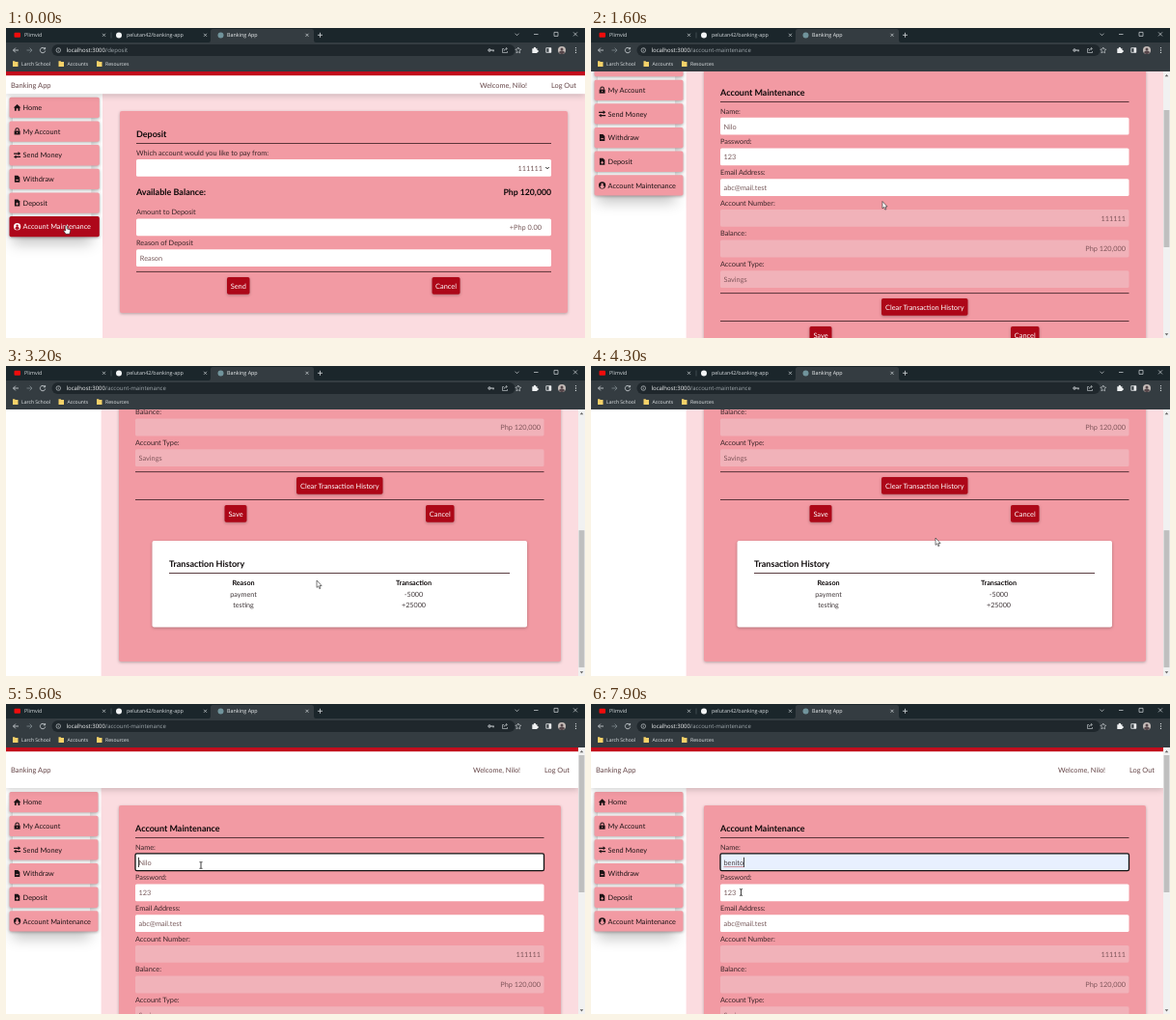
Animation, 600 px wide and 321 px high, one loop 8000 ms. Source, as an HTML page:

```html
<!DOCTYPE html>
<html lang="en">
<head>
<meta charset="utf-8">
<title>Banking App</title>
<style>
  html, body { margin: 0; width: 100%; height: 100%; overflow: hidden; }
  svg { display: block; width: 600px; height: 321px; }
  text { font-family: Lato, "Open Sans", sans-serif; text-rendering: geometricPrecision; white-space: pre; }
  .ui text { font-family: "Open Sans", "Noto Sans", sans-serif; }
  .bold { font-weight: 700; }
  .card { filter: drop-shadow(0 1px 1.5px rgba(0, 0, 0, .28)); }
  .head { filter: drop-shadow(0 2px 3px rgba(0, 0, 0, .18)); }
  .list { filter: drop-shadow(0 9px 7px rgba(0, 0, 0, .22)); }
  .item rect { fill: #f29aa3; filter: drop-shadow(0 1px 1.5px rgba(0, 0, 0, .3)); }
  .item { fill: #1c1315; color: #f29aa3; }
  .item.hot { fill: #fff; color: #ae071a; }
  .item.hot rect { fill: #ae071a; }
</style>
</head>
<body>
<svg id="stage" viewBox="0 0 600 321"></svg>
<script>
const PINK = '#fbdce0', ROSE = '#f29aa3', RED = '#ad0718', INK = '#3a2528', SOFT = '#77595a', BLACK = '#0d0809';
const BASE = 7.35, LOOP = 8000, PITCH = 24.65;

const rect = (x, y, w, h, fill, more = '') =>
  `<rect x="${x}" y="${y}" width="${w}" height="${h}" fill="${fill}" ${more}/>`;
// y is the optical middle of the line
const text = (s, x, y, fill = INK, size = BASE, more = '') =>
  `<text x="${x}" y="${y + size * .35}" font-size="${size}" fill="${fill}" ${more}>${s}</text>`;
const path = (d, more = '') => `<path d="${d}" ${more}/>`;
const line = (d, color, w = .8, more = '') => path(d, `fill="none" stroke="${color}" stroke-width="${w}" ${more}`);
const dot = (x, y, r, fill, more = '') => `<circle cx="${x}" cy="${y}" r="${r}" fill="${fill}" ${more}/>`;
const at = (x, y, body, more = '') => `<g transform="translate(${x} ${y})" ${more}>${body}</g>`;
const END = 'text-anchor="end"', MID = 'text-anchor="middle"', BOLD = 'class="bold"';

const rule = (x1, x2, y) => line(`M${x1} ${y}H${x2}`, '#4a2a2e', .9);
const title = (s, x, y) => text(s, x, y, BLACK, 9, BOLD);
const box = (x, y, w, fill = '#fff', more = '') => rect(x, y, w, 17.8, fill, 'rx="1.6" ' + more);
const button = (s, x, y, w) =>
  rect(x, y, w, 17.8, RED, 'rx="1.8" class="card"') + text(s, x + w / 2, y + 9.1, '#fff', 7.4, MID);

// Sidebar icons, each about 7 px around the origin
const file = 'M-2.7 -3.5H.7L2.7 -1.5V3.5H-2.7Z';
const icons = {
  'Home': path('M-3.8 .2L0 -3.4L3.8 .2H2.7V3.3H.9V.9H-.9V3.3H-2.7V.2Z'),
  'My Account': path('M-3 -.6H3V3.4H-3Z') + line('M-1.7 -.5V-1.6A1.7 1.7 0 0 1 1.7 -1.6V-.5', 'inherit', 1.1, 'style="stroke:#1c1315"') + dot(0, 1.3, .6, 'currentColor'),
  'Send Money': path('M-3.5 -2.2H1V-3.6L3.6 -1.6L1 .3V-1H-3.5ZM3.5 1.1H-1V-.2L-3.6 1.7L-1 3.6V2.3H3.5Z'),
  'Withdraw': path(file) + line('M-1.4 1.1H1.4', 'currentColor', .9),
  'Deposit': path(file) + line('M-1.4 1.1H1.4M0 -.3V2.5', 'currentColor', .9),
  'Account Maintenance': dot(0, 0, 3.6, 'inherit', 'style="fill:inherit"') + dot(0, -1, 1.2, 'currentColor') + path('M-2.2 2A2.2 2 0 0 1 2.2 2A3 3 0 0 1 -2.2 2Z', 'fill="currentColor"')
};

const sidebar = (top, w) =>
  rect(7, top + 4, w - 12, 139, '#fff', 'class="list"') +
  Object.keys(icons).map((name, i) => {
    const y = top + i * PITCH;
    return `<g class="item">${rect(3.5, y, w, 21.3, ROSE, 'rx="1.8"')}` +
      at(11.6, y + 10.6, icons[name]) + text(name, 17.6, y + 10.8, 'inherit', BASE, 'style="fill:inherit"') + '</g>';
  }).join('');

const header = (w, h, right) =>
  rect(0, 49, w, h, '#fff', 'class="head"') + rect(0, 45, w, 4.2, '#c20c1c') +
  text('Banking App', 5, 49.8 + h / 2, '#654547', 7.5) +
  text('Welcome, Nilo!', right, 49.8 + h / 2, '#654547') + text('Log Out', right + 74, 49.8 + h / 2, '#654547');

function depositPage() {
  return rect(0, 45, 600, 276, PINK) + rect(0, 45, 100, 276, '#fff') +
    sidebar(71.8, 93.3) + header(600, 19.2, 491) +
    rect(118, 86, 464, 209, ROSE, 'rx="2" class="card"') +
    title('Deposit', 135, 110) + rule(135, 565, 119.5) +
    text('Which account would you like to pay from:', 135, 129) + box(135, 136, 430) +
    text('111111', 556, 145, SOFT, BASE, END) + line('M559.3 144L561 145.8L562.7 144', '#222', 1) +
    text('Available Balance:', 135, 170.3, BLACK, 9, BOLD) +
    text('Php 120,000', 565, 170.3, BLACK, 8.7, 'class="bold" ' + END) +
    text('Amount to Deposit', 135, 190.7) + box(135, 197.4, 430) +
    text('+Php 0.00', 555, 206.5, SOFT, BASE, END) +
    text('Reason of Deposit', 135, 222.5) + box(135, 229.3, 430) + text('Reason', 138.8, 238.4, SOFT) +
    rule(135, 565, 252.4) + button('Send', 229, 258, 23.5) + button('Cancel', 441.5, 258, 29);
}

const fields = [
  ['Name:', ''], ['Password:', '123'], ['Email Address:', 'abc@mail.test'],
  ['Account Number:', '111111', 1], ['Balance:', 'Php 120,000', 1], ['Account Type:', 'Savings']
];

function accountPage() {
  const rows = fields.map(([label, value, right], i) => {
    const y = 148 + i * 31.7;
    return text(label, 134, y) + box(134, y + 6.8, 423.5, i < 3 ? '#fff' : '#f1b2b9', i ? '' : 'id="name"') +
      text(value, right ? 554 : 137.5, y + 15.9, i < 3 ? SOFT : '#80565b', BASE, right ? END : '');
  }).join('');
  const history = [['Reason', 'Transaction'], ['payment', '-5000'], ['testing', '+25000']].map((row, i) =>
    row.map((s, j) => text(s, j ? 422.5 : 246, 451.5 + i * 11.6, i ? '#41383a' : BLACK, 7.2, MID + (i ? '' : BOLD))).join('')
  ).join('');
  return rect(0, 45, 593, 504, PINK) + rect(0, 45, 98.6, 504, '#fff') +
    sidebar(91, 92) + header(593, 38, 484) +
    rect(117, 105, 458, 428, ROSE, 'rx="2" class="card"') +
    title('Account Maintenance', 134, 129) + rule(134, 557.5, 138.5) + rows +
    `<text id="typed" x="137.5" y="166.6" font-size="${BASE}"></text>` +
    line('', '#b4474d', .6, 'id="spell"') + line('', '#111', .8, 'id="caret"') +
    rule(134, 557.5, 336.6) + button('Clear Transaction History', 301, 342, 89.5) +
    rule(134, 557.5, 365.5) + button('Save', 226.5, 371, 23) + button('Cancel', 435, 371, 29.5) +
    rect(151.5, 408, 388.5, 89.5, '#fff', 'rx="2" class="card"') +
    title('Transaction History', 169, 432) + rule(169, 522, 441.5) + history;
}

function browser() {
  const pale = '#d5dadd', bar = '#343c41';
  const cross = (x, y, r) => line(`M${x - r} ${y - r}l${2 * r} ${2 * r}m0 ${-2 * r}l${-2 * r} ${2 * r}`, pale, .7);
  const folder = (x, s) => path(`M${x} 34.3h2l.8 .8h2.7v5h-5.5z`, 'fill="#f5d169"') + text(s, x + 9, 37.2, '#e4e8ea', 5.1);
  return rect(0, 0, 600, 45, '#1b262b') + rect(0, 15, 600, 30, bar) +
    path('M210 15Q212 15 212 12.5V3.5Q212 1 214.5 1H316.5Q319 1 319 3.5V12.5Q319 15 321 15Z', `fill="${bar}"`) +
    rect(8.5, 4.7, 6.5, 5, '#f00c0c', 'rx="1"') + text('Plimvid', 19, 7.4, pale, 5.4) +
    dot(117, 7.4, 3, '#f4f6f7') + text('pelutan42/banking-app', 125, 7.4, pale, 5.4) +
    dot(222.5, 7.4, 3, '#71949c') + text('Banking App', 229, 7.4, '#eef1f2', 5.4) +
    cross(101.5, 7.3, 1.5) + cross(206.5, 7.3, 1.5) + cross(312, 7.3, 1.5) +
    line('M109 4.5V10.5', '#59656a', .6) + line('M323 7.3h5m-2.5 -2.5v5', pale) +
    line('M527.5 5.7l2 2l2 -2M547 6.5h4.5M568 4.4h4v4h-4z', pale, .7) + cross(590, 6.4, 2) +
    line('M13 23H7.5m2.4 -2.4L7.5 23l2.4 2.4', pale) +
    line('M21.5 23H27m-2.4 -2.4L27 23l-2.4 2.4', '#7f898e') +
    line('M40.2 21.4A2.7 2.7 0 1 0 40.7 23.6M40.6 20v1.8h-1.9', pale) +
    rect(47.5, 17, 480, 12, '#1f272c', 'rx="6"') +
    dot(54.3, 23, 2.3, 'none', `stroke="${pale}" stroke-width=".6"`) + line('M54.3 22.6v1.6M54.3 21.5v.6', pale, .6) +
    `<text x="62.5" y="25.1" font-size="6" fill="#f2f4f5">localhost:3000<tspan id="route" fill="#a0a9ae"></tspan></text>` +
    `<g id="key">${dot(501, 23, 1.2, 'none', `stroke="${pale}" stroke-width=".9"`)}${line('M502.2 23h3.6m-.8 0v1.4', pale, .9)}</g>` +
    line('M516 21.5h-1.5v4h5V24M516 23.8q.3 -2.4 3.2 -2.4m-1.2 -1.3l1.4 1.3l-1.4 1.3', pale, .6) +
    line('M530.8 20l.9 1.9l2.1 .3l-1.5 1.5l.3 2.1l-1.8 -1l-1.9 1l.4 -2.1l-1.5 -1.5l2.1 -.3z', pale, .6) +
    path('M545.3 21.3h1.6a1.1 1.1 0 1 1 2 0h1.6v1.7a1 1 0 1 1 0 1.9v1.2h-5.2z', 'fill="#f0f2f3"') +
    line('M559.8 20.7h5v4.6h-5z', '#f0f2f3', .8) + rect(562.5, 20.7, 2.3, 4.6, '#f0f2f3') +
    dot(576, 23, 4, '#c5bcb8') + dot(576, 22, 1.5, '#55464a') + path('M573.2 25.8a2.8 2.4 0 0 1 5.6 0a4 4 0 0 1 -5.6 0z', 'fill="#55464a"') +
    [20.6, 23, 25.4].map(y => dot(590.5, y, .65, pale)).join('') +
    folder(7, 'Larch School') + folder(54.5, 'Accounts') + folder(94, 'Resources');
}

const bar = rect(593, 45, 7, 276, '#f1f1f1') +
  path('M594.7 50.2L596.5 48L598.3 50.2ZM594.7 316.2L596.5 318.4L598.3 316.2Z', 'fill="#666"') +
  rect(593.6, 53, 5.8, 142, '#bfbfbf', 'id="thumb"');

const pointers = {
  arrow: path('M0 0V7.4L1.7 5.9L2.8 8.6L4 8.1L2.9 5.5H5.1Z', 'fill="#fff" stroke="#222" stroke-width=".6"'),
  beam: line('M-1.5 -3.3H-.4L0 -3L.4 -3.3H1.5M0 -3V3M-1.5 3.3H-.4L0 3L.4 3.3H1.5', '#111', .8),
  hand: path('M-.8 0Q0 -.8 .8 0V3L3.6 3.8Q4.4 4.2 4.1 5.2L3.3 8.3H-.6L-2.8 5Q-2.6 3.9 -.8 5Z', 'fill="#fff" stroke="#222" stroke-width=".6"')
};

const stage = document.getElementById('stage');
stage.innerHTML =
  `<g id="deposit">${depositPage()}</g>` +
  `<g id="account"><g id="page">${accountPage()}</g>${bar}</g>` +
  `<g class="ui">${browser()}</g>` +
  `<g id="pointer">${Object.keys(pointers).map(k => `<g id="${k}">${pointers[k]}</g>`).join('')}</g>`;

const $ = id => document.getElementById(id);
const show = (node, on) => node.setAttribute('visibility', on ? 'visible' : 'hidden');
const set = (id, attrs) => Object.entries(attrs).forEach(([k, v]) => $(id).setAttribute(k, v));

const scrollKeys = [[1400, 0], [1600, 62], [1800, 150], [2000, 224], [2100, 227], [4300, 227], [4500, 150], [4700, 48], [4800, 16], [4900, 0]];
const pointerKeys = [
  [0, 62.5, 205], [500, 62.5, 205], [1300, 302, 180], [1600, 302, 179.5], [2000, 300, 201], [2700, 300, 201],
  [3200, 322, 222], [3800, 357, 178], [4300, 357, 178], [4700, 324, 191.5], [5400, 202, 167], [7300, 202, 167], [7800, 155.5, 195]
];

function track(keys, t, k = 1) {
  const i = keys.findIndex(key => key[0] > t);
  if (i === 0) return keys[0][k];
  if (i < 0) return keys[keys.length - 1][k];
  const a = keys[i - 1], b = keys[i];
  return a[k] + (b[k] - a[k]) * (t - a[0]) / (b[0] - a[0]);
}

const NAME = 'benito', ROUTE = 500, FOCUS = 5400, TYPE = 5900, STROKE = 150, FILL = 6900;

function typing(t) {
  const n = Math.max(0, Math.min(NAME.length, Math.floor((t - TYPE) / STROKE) + 1));
  const focus = t >= FOCUS, typed = $('typed');
  typed.textContent = n ? NAME.slice(0, n) : 'Nilo';
  typed.setAttribute('fill', n ? '#4a4142' : SOFT);
  const end = 137.5 + (n ? typed.getComputedTextLength() + .4 : 0);
  const lastKey = n ? TYPE + (n - 1) * STROKE : FOCUS;
  set('caret', { d: `M${end} 158.8V169` });
  show($('caret'), focus && (t - lastKey) % 1060 < 530);
  set('spell', { d: n === NAME.length ? `M137.5 168.6H${end}` : '' });
  set('name', { fill: t >= FILL ? '#e8f0fe' : '#fff', stroke: focus ? '#111' : 'none', 'stroke-width': 1.3 });
}

function render(t) {
  const onAccount = t >= ROUTE;
  const scroll = track(scrollKeys, t);
  const x = track(pointerKeys, t, 1), y = track(pointerKeys, t, 2);
  show($('deposit'), !onAccount);
  $('account').style.display = onAccount ? '' : 'none';
  set('page', { transform: `translate(0 ${-scroll})` });
  set('thumb', { y: 53 + scroll * .516 });
  $('route').textContent = onAccount ? '/account-maintenance' : '/deposit';
  show($('key'), t < 7400);

  const top = onAccount ? 91 - scroll : 71.8;
  let hot = false;
  $(onAccount ? 'account' : 'deposit').querySelectorAll('.item').forEach((item, i) => {
    const dy = y - top - i * PITCH;
    const over = x > 3.5 && x < 96 && dy >= 0 && dy < 21.3;
    item.classList.toggle('hot', over);
    hot = hot || over;
  });
  if (onAccount) typing(t);

  const shape = hot ? 'hand' : t >= 4600 ? 'beam' : 'arrow';
  Object.keys(pointers).forEach(k => show($(k), k === shape));
  set('pointer', { transform: `translate(${x} ${y})` });
}

const start = performance.now();
function tick() {
  const t = (performance.now() - start) % LOOP;
  render(Math.floor(t / 100) * 100);
  requestAnimationFrame(tick);
}
tick();
</script>
</body>
</html>
```
